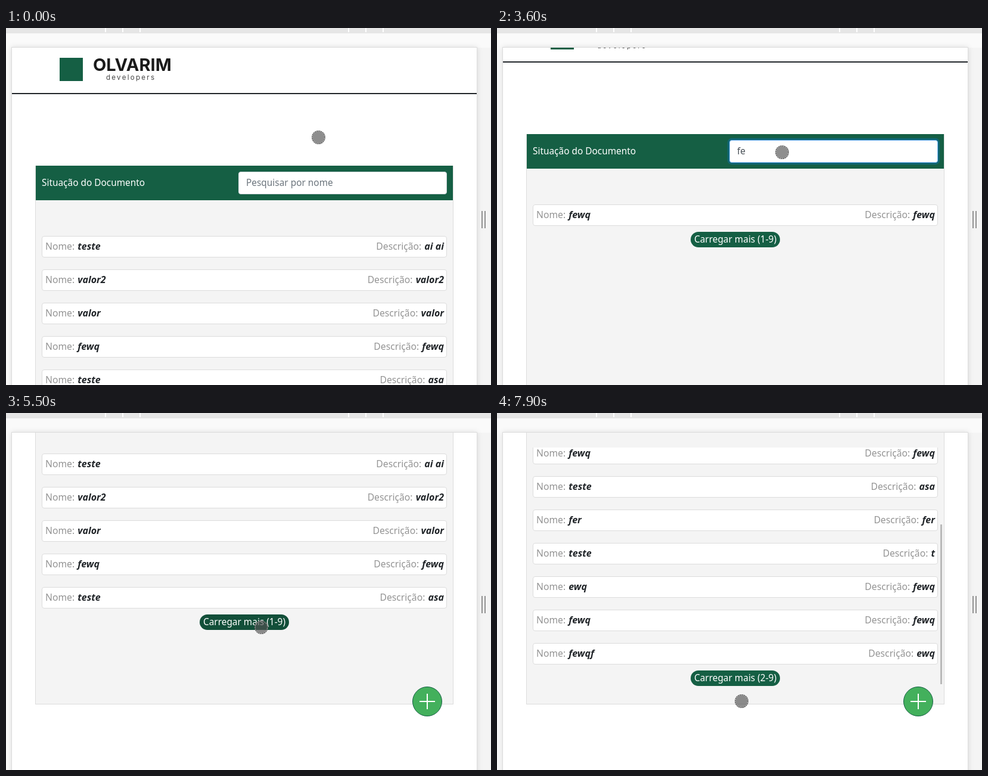
Recreate the animation shown at these times as an HTML page. Size 814 by 599 pixels, loop 8000 ms.

```html
<!DOCTYPE html>
<html lang="pt">
<head>
<meta charset="utf-8">
<title>Situação do Documento</title>
<style>
  html, body { margin: 0; width: 100%; height: 100%; overflow: hidden; }
  body { position: relative; background: #fafafa; color: #212529; font: 15.4px "Noto Sans", "Open Sans", sans-serif; }
  body * { position: absolute; box-sizing: border-box; white-space: nowrap; }
  .bar { left: 0; top: 0; width: 100%; height: 9px; background: #e6e6e6; }
  .bar i { top: 0; width: 2px; height: 7px; background: #fff; }
  .side { left: 791px; top: 33px; right: 0; bottom: 0; background: #f4f4f4; }
  .side i { top: 274px; width: 2px; height: 29px; background: #929292; }
  .frame { left: 9px; top: 32px; width: 782px; height: 600px; background: #fff; border: 1px solid #dcdcdc; box-shadow: 0 0 9px rgba(0,0,0,.12); }
  .view { left: 10px; top: 33px; width: 780px; bottom: 0; overflow: hidden; }
  #page { left: -10px; top: -33px; width: 814px; height: 840px; }
  .mark { left: 90px; top: 50px; width: 39px; height: 39px; background: #155f44; }
  .brand { left: 146px; top: 44px; font: 700 29px/36px Inter, sans-serif; color: #1a1a1a; }
  .tagline { left: 168px; top: 75px; font: 11.5px/16px Inter, sans-serif; letter-spacing: 2.3px; color: #444; }
  .rule { left: 10px; top: 109px; width: 780px; height: 2px; background: #212529; }
  .panel { left: 49px; top: 231px; width: 702px; height: 539px; background: #f4f4f4; border: 1px solid #dcdcdc; }
  .head { left: 50px; top: 231px; width: 700px; height: 58px; padding-left: 10px; background: #155f44; color: #fff; line-height: 57px; }
  #field { left: 340px; top: 10px; width: 350px; height: 38px; padding-left: 12px; border: 1px solid #ced4da; border-radius: 4px; background: #fff; color: #495057; line-height: 36px; }
  #field.focus { border-color: #80bdff; box-shadow: 0 0 0 3.2px rgba(0,123,255,.25); }
  #field span { position: static; }
  #caret { display: inline-block; width: 1px; height: 18px; margin-right: -1px; vertical-align: -4px; background: #333; }
  #hint { color: #6c757d; }
  #list { left: 50px; top: 339px; width: 700px; height: 400px; overflow: hidden; }
  #items { left: 0; top: 0; width: 700px; height: 600px; }
  .row { left: 10px; width: 680px; height: 36px; border: 1px solid #dcdcdc; border-radius: 4px; background: #fff; color: #949494; font-size: 15.7px; line-height: 32px; }
  .row span { left: 5px; }
  .row span + span { left: auto; right: 4px; }
  .row b { position: static; margin-left: 1px; font-size: 16px; font-style: italic; color: #212529; }
  #more { left: 275px; width: 150px; height: 26px; border-radius: 13px; color: #fff; line-height: 25px; text-align: center; }
  .thumb { top: 2px; width: 3px; background: rgba(128,128,128,.5); }
  #pageThumb { left: 774px; height: 379px; }
  #listThumb { left: 694px; height: 268px; }
  .add { left: 682px; top: 740px; width: 50px; height: 50px; border: 1px solid #155f44; border-radius: 50%; background: #43b05c; }
  .add i { left: 11px; top: 23px; width: 26px; height: 2px; background: #fff; }
  .add i + i { transform: rotate(90deg); }
  #touch { left: -12px; top: -12px; }
</style>
</head>
<body>
<div class="bar"></div>
<div class="side"><i style="left:7px"></i><i style="left:12px"></i></div>
<div class="frame"></div>
<div class="view">
  <div id="page">
    <div class="mark"></div>
    <div class="brand">OLVARIM</div>
    <div class="tagline">developers</div>
    <div class="rule"></div>
    <div class="panel"></div>
    <div class="head">Situação do Documento<div id="field"><span id="typed"></span><span id="caret"></span><span id="hint">Pesquisar por nome</span></div></div>
    <div id="list">
      <div id="items"><div id="more"></div></div>
      <div id="listThumb" class="thumb"></div>
    </div>
    <div class="add"><i></i><i></i></div>
  </div>
  <div id="pageThumb" class="thumb"></div>
</div>
<svg id="touch" width="24" height="24">
  <circle cx="12" cy="12" r="11.5" fill="rgba(82,82,82,.65)"/>
  <circle cx="12" cy="12" r="10.5" fill="none" stroke="#fff" stroke-opacity=".7"/>
  <circle cx="12" cy="12" r="10.5" fill="none" stroke="#111" stroke-dasharray="1.7 1.6"/>
</svg>
<script>
const LOOP = 8000, STEP = 100, PITCH = 56, LOAD_TIME = 5700;
const $ = id => document.getElementById(id);

const entries = "teste:ai ai valor2:valor2 valor:valor fewq:fewq teste:asa fer:fer teste:t ewq:fewq fewq:fewq fewqf:ewq"
  .split(/ (?=\w+:)/).map(entry => entry.split(":"));
const searches = [[0, ""], [1300, "te"], [1600, "tes"], [2400, "te"], [3000, "tew"], [3600, "fe"], [3900, ""]];

const during = (t, from, to) => t >= from && t < to;
const clamp = v => Math.min(1, Math.max(0, v));
const ease = (t, from, to) => {
  const u = clamp((t - from) / (to - from));
  return u * u * (3 - 2 * u);
};
// Visible between two times, then fading away
const flash = (t, from, to) => t < from ? 0 : clamp(1 - (t - to) / 300);

const pageScroll = t => 53 * ease(t, 200, 600) + 228 * ease(t, 4300, 4634);
const listScroll = t => 148 * ease(t, 6100, 6300) + 38 * ease(t, 6400, 6500) - 186 * ease(t, 6600, 6900)
  + 53 * ease(t, 7200, 7400) + 133 * ease(t, 7600, 7900);

function touchPoint(t) {
  let x = 524.5, y = 183.5;
  const glide = (from, to, nextX, nextY) => {
    const u = ease(t, from, to);
    x += (nextX - x) * u;
    y += (nextY - y) * u;
  };
  glide(0, 800, 478.5, 208.5);
  glide(4300, 4600, 568.5, 299.5);
  glide(4800, 5200, 428.5, 359.5);
  glide(5600, 6000, 216.5, 217.5);
  glide(6600, 6900, 426.5, 328.5);
  glide(7600, 7900, 410.5, 483.5);
  return [x, y];
}

const move = (el, x, y) => el.style.transform = `translate(${x}px, ${y}px)`;

for (let i = 0; i < 6; i++) {
  const notch = document.createElement("i");
  notch.style.left = (i < 3 ? 166 : 574) + 29 * (i % 3) + "px";
  document.querySelector(".bar").append(notch);
}
const rows = entries.map(([name, text]) => {
  const row = document.createElement("div");
  row.className = "row";
  row.innerHTML = `<span>Nome: <b>${name}</b></span><span>Descrição: <b>${text}</b></span>`;
  $("items").append(row);
  return row;
});

function drawList(t, query) {
  const loaded = t >= LOAD_TIME;
  let shown = 0;
  rows.forEach((row, i) => {
    const visible = i < (loaded ? 10 : 5) && entries[i][0].includes(query);
    row.style.display = visible ? "" : "none";
    if (visible) row.style.top = 10 + PITCH * shown++ + "px";
  });
  $("more").style.top = PITCH * shown + "px";
  $("more").style.background = during(t, 5200, LOAD_TIME) ? "#124f39" : "#155f44";
  $("more").textContent = `Carregar mais (${loaded ? 2 : 1}-9)`;
}

function drawField(t, query) {
  const caretOn = during(t, 1000, 2100) || during(t, 3000, 3600) || during(t, 4100, 4600);
  $("typed").textContent = query;
  $("hint").style.display = query ? "none" : "";
  $("field").classList.toggle("focus", during(t, 1000, 5200));
  $("caret").style.visibility = caretOn ? "visible" : "hidden";
}

function draw(t) {
  const query = searches.filter(([start]) => start <= t).pop()[1];
  const outer = Math.round(pageScroll(t));
  const inner = Math.round(listScroll(t));
  drawList(t, query);
  drawField(t, query);
  move($("page"), 0, -outer);
  move($("items"), 0, -inner);
  move($("pageThumb"), 0, Math.round(0.661 * outer));
  move($("listThumb"), 0, Math.round(0.683 * inner));
  $("pageThumb").style.opacity = Math.max(flash(t, 300, 900), flash(t, 4400, 4900));
  $("listThumb").style.opacity = Math.max(flash(t, LOAD_TIME, LOAD_TIME), flash(t, 6200, LOOP));
  move($("touch"), ...touchPoint(t));
}

function tick(now) {
  draw(Math.floor(now % LOOP / STEP) * STEP);
  requestAnimationFrame(tick);
}
draw(0);
requestAnimationFrame(tick);
</script>
</body>
</html>
```
